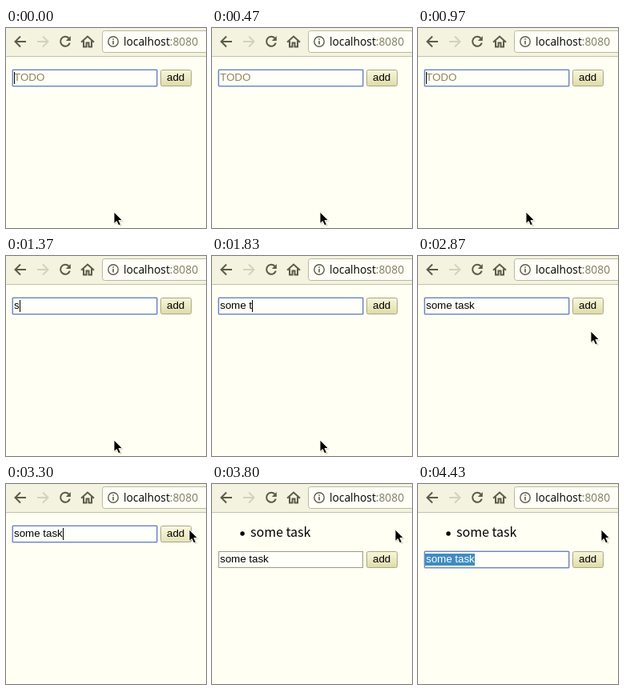
An HTML page that plays this animation: 250 px wide and 250 px high, repeating every 4510 ms.

```html
<!DOCTYPE html>
<html lang="en">
<head>
<meta charset="utf-8">
<title>Todo form</title>
<style>
  html, body { margin: 0; width: 100%; height: 100%; overflow: hidden; background: #fffff3; }
  svg { display: block; width: 250px; height: 250px; }
  text { white-space: pre; }
  .ui { font: 13.333px "Liberation Sans", Arial, sans-serif; }
  .url { font: 13.8px "Open Sans", "Noto Sans", sans-serif; }
  .item { font: 16px "Noto Sans CJK JP", "Noto Sans CJK", "Open Sans", sans-serif; }
  .icon { fill: none; stroke: #5b5b4c; stroke-width: 2; }
</style>
</head>
<body>
<svg viewBox="0 0 250 250">
  <defs>
    <linearGradient id="face" x2="0" y2="1">
      <stop offset="0" stop-color="#f6f5d8"/><stop offset=".4" stop-color="#efedc8"/><stop offset="1" stop-color="#dedba9"/>
    </linearGradient>
    <linearGradient id="hover" x2="0" y2="1">
      <stop offset="0" stop-color="#faf9e0"/><stop offset="1" stop-color="#e6e3b8"/>
    </linearGradient>
    <linearGradient id="pressed" x2="0" y2="1">
      <stop offset="0" stop-color="#d8d5a6"/><stop offset="1" stop-color="#ecebc8"/>
    </linearGradient>
  </defs>

  <rect width="250" height="35" fill="#f4f3e0"/>
  <path d="M0 35.5H250" stroke="#c2c1a8"/>
  <rect x="120.5" y="3.5" width="150" height="27" rx="3" fill="#fffff8" stroke="#b9b8a0"/>
  <g class="icon">
    <path id="arrow" d="M25 17H12M18 10.5L11.5 17L18 23.5"/>
    <path d="M39 17H52M46 10.5L52.5 17L46 23.5" stroke="#d3d2bd"/>
    <path d="M78.5 12.6A6 6 0 1 0 79.8 18.7"/>
    <path d="M80.8 10V16H74.8Z" fill="#5b5b4c" stroke="none"/>
    <path d="M94 17.8L102 10.6L110 17.8M97 16V23.5H100.5V18.5H103.5V23.5H107V16"/>
    <circle cx="134" cy="17" r="6.2" stroke-width="1.4"/>
    <path d="M134 16V20.5M134 13.2V14.8" stroke-width="1.6"/>
  </g>
  <text class="url" x="147" y="22">localhost<tspan fill="#7d7c5c">:8080</tspan></text>

  <g id="list">
    <circle cx="38" cy="62" r="2.7"/>
    <text class="item" x="48" y="66">some task</text>
  </g>

  <g id="form" class="ui">
    <rect x="8.5" y="52.5" width="180" height="20" fill="#fffffa" stroke="#9c9b82"/>
    <g id="ring" fill="none">
      <rect x="8" y="52" width="181" height="21" rx="1.5" stroke="#a9b8e0" stroke-width="1.6"/>
      <rect x="8.5" y="52.5" width="180" height="20" stroke="#7085bd"/>
    </g>
    <rect id="selection" x="9" y="55" width="62" height="15" fill="#3f8cc4"/>
    <text id="value" x="10" y="66"></text>
    <path id="caret" d="M0 55V70" stroke="#000"/>
    <rect id="button" x="193.5" y="52.5" width="38" height="20" rx="2" stroke="#aaa884"/>
    <text x="201" y="66">add</text>
  </g>

  <g id="pointer">
    <path d="M1.5 1.5V16L5 13L7.5 18L10 17L7.7 12H12Z" fill="#000" opacity=".16"/>
    <path d="M0 0V14.5L3.3 11.5L5.7 16.8L8.3 15.6L5.9 10.5H10.4Z" stroke="#fffff3" stroke-width=".9"/>
  </g>
</svg>
<script>
const LOOP = 4510, TASK = "some task";
const KEYS = [1350, 1450, 1550, 1650, 1730, 1800, 1950, 2040, 2140];
const PRESS = 3400, RELEASE = 3490, REFOCUS = 4130;
// time, x, y of the pointer tip
const PATH = [[2590, 135, 230], [2670, 145, 221], [2870, 216, 94], [3050, 232, 62], [3170, 229, 57]];

const el = id => document.getElementById(id);
const show = (id, on) => el(id).setAttribute("visibility", on ? "visible" : "hidden");

function pointerAt(t) {
  if (t <= PATH[0][0]) return PATH[0].slice(1);
  const i = PATH.findIndex(p => p[0] > t);
  if (i < 0) return PATH[PATH.length - 1].slice(1);
  const [t0, x0, y0] = PATH[i - 1], [t1, x1, y1] = PATH[i];
  const k = (t - t0) / (t1 - t0);
  return [Math.round(x0 + (x1 - x0) * k), Math.round(y0 + (y1 - y0) * k)];
}

function draw(t) {
  const typed = KEYS.filter(k => k <= t).length;
  const added = t >= RELEASE, selected = t >= REFOCUS;
  const editing = t < PRESS;
  const value = el("value");

  value.textContent = typed ? TASK.slice(0, typed) : "TODO";
  value.setAttribute("fill", selected ? "#fffff8" : typed ? "#000" : "#8d8655");
  show("selection", selected);
  show("ring", editing || selected);
  show("list", added);
  el("form").setAttribute("transform", `translate(0 ${added ? 32 : 0})`);

  const sinceBlink = typed ? t - KEYS[typed - 1] : t + 100;
  show("caret", editing && sinceBlink % 1000 < 500);
  const caretX = typed ? Math.round(10 + value.getComputedTextLength()) + .5 : 10.5;
  el("caret").setAttribute("transform", `translate(${caretX} 0)`);

  const [x, y] = pointerAt(t);
  const over = !added && x >= 193 && x <= 232 && y >= 52 && y <= 73;
  const face = over ? (editing ? "hover" : "pressed") : "face";
  el("button").setAttribute("fill", `url(#${face})`);
  el("pointer").setAttribute("transform", `translate(${x} ${y})`);
}

function tick() {
  draw(performance.now() % LOOP);
  requestAnimationFrame(tick);
}
tick();
</script>
</body>
</html>
```
